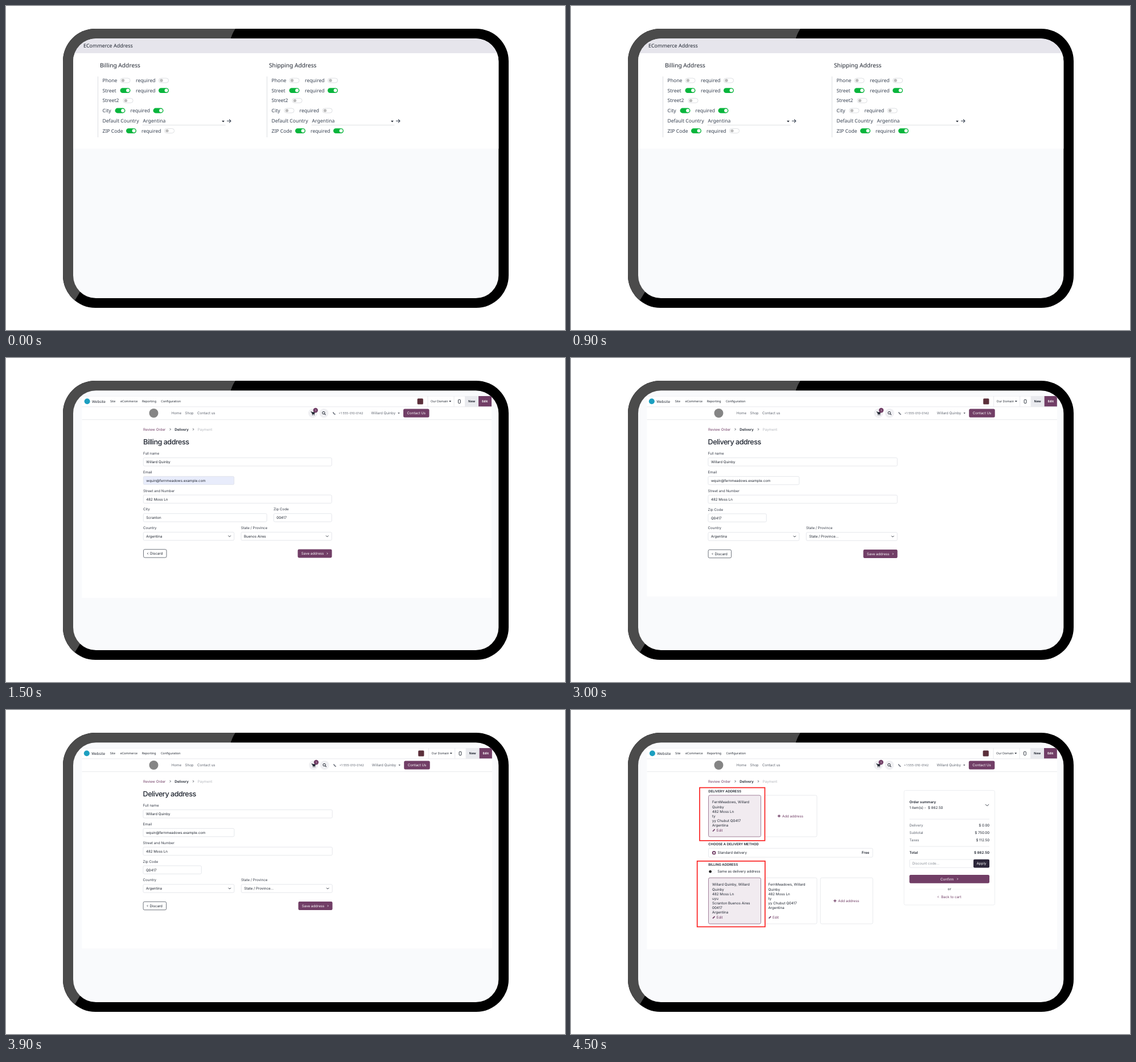
An HTML page that plays this animation: 982x570 px, repeating every 6000 ms.

```html
<!DOCTYPE html>
<html lang="en">
<head>
<meta charset="utf-8">
<title>Checkout address settings</title>
<style>
html, body { margin: 0; height: 100%; overflow: hidden; background: #fff; }
svg { display: block; }
text { font-family: Inter, sans-serif; text-rendering: geometricPrecision; white-space: pre; }
.ui { font-family: "Noto Sans", "Open Sans", sans-serif; }
</style>
</head>
<body>
<svg id="stage" width="982" height="570" viewBox="0 0 982 570"></svg>
<script>
const PLUM = '#713e66', INK = '#1f2530', SOFT = '#5f6570', LINE = '#e3e5e9';
const PERSON = 'Willard Quinby', COMPANY = 'FernMeadows', STREET = '482 Moss Ln';
const EMAIL = 'wquin@fernmeadows.example.com', ZIP = '00417', ZIP2 = 'Q0417';
const [FIRST, LAST] = PERSON.split(' ');

// Text is placed by its left edge and the middle of its capitals.
const text = (x, y, s, { size = 6.2, fill = INK, weight = 400, anchor = 'start', cls = '', gap = 0 } = {}) =>
  `<text x="${x}" y="${y + size * .36}" font-size="${size}" fill="${fill}" font-weight="${weight}" text-anchor="${anchor}" class="${cls}" letter-spacing="${gap}">${s}</text>`;
const ui = (x, y, s, size, weight = 500, fill = INK) => text(x, y, s, { size, weight, fill, cls: 'ui' });
const rect = (x, y, w, h, fill = 'none', stroke = 'none', r = 0, sw = .8) =>
  `<rect x="${x}" y="${y}" width="${w}" height="${h}" rx="${r}" fill="${fill}" stroke="${stroke}" stroke-width="${sw}"/>`;
const dot = (x, y, r, fill, stroke = 'none', sw = 1) =>
  `<circle cx="${x}" cy="${y}" r="${r}" fill="${fill}" stroke="${stroke}" stroke-width="${sw}"/>`;
const path = (d, stroke = INK, sw = .9, fill = 'none') =>
  `<path d="${d}" stroke="${stroke}" stroke-width="${sw}" fill="${fill}"/>`;
const hline = (x1, x2, y, c = LINE) => path(`M${x1} ${y}H${x2}`, c, .8);
const vline = (x, y1, y2, c = LINE) => path(`M${x} ${y1}V${y2}`, c, .8);
const caret = (x, y, s = 2) => path(`M${x - s} ${y - s / 2}h${2 * s}l${-s} ${s * 1.1}z`, 'none', 0, INK);
const down = (x, y, s = 2.2) => path(`M${x - s} ${y - s / 2}l${s} ${s}l${s} ${-s}`);
const right = (x, y, c = INK, s = 1.7) => path(`M${x - s / 2} ${y - s}l${s} ${s}l${-s} ${s}`, c, .8);
const left = (x, y, c = INK, s = 1.5) => path(`M${x + s / 2} ${y - s}l${-s} ${s}l${s} ${s}`, c, .8);

function toggle(x, y, on) {
  return on
    ? rect(x, y - 4.4, 18, 8.8, '#08b53c', 'none', 4.4) + dot(x + 13.6, y, 3, '#fff')
    : rect(x + .4, y - 4, 17.2, 8, '#fff', '#d5d7db', 4) + dot(x + 5, y, 2.7, '#bcbcbc');
}

// Settings column: each row is [label, toggle x, on, "required" x, on].
function settings(x, title, rows) {
  const ys = [131, 148.6, 166.4, 184, 219.6];
  const label = (dx, y, s) => ui(x + dx, y, s, 8.6, 500, '#374151');
  let out = ui(x + 3.5, 104, title, 10.2) + vline(x, 124, 231, '#d3d6db');
  rows.forEach(([name, tx, on, rx, req], i) => {
    out += label(8, ys[i], name) + toggle(x + tx, ys[i], on);
    if (rx) out += label(rx, ys[i], 'required') + toggle(x + rx + 40, ys[i], req);
  });
  return out + label(8, 202, 'Default Country') + ui(x + 79, 202, 'Argentina', 8.6, 400, '#374151') +
    hline(x + 78, x + 224, 209.5, '#d8dadd') + caret(x + 220, 203, 2.4) +
    path(`M${x + 226.5} 202.3h7m-3 -3l3 3l-3 3`, '#374151', 1.1);
}

const column = (x, title, city, zipReq) => settings(x, title, [
  ['Phone', 39, false, 66.5, false],
  ['Street', 39, true, 66.5, true],
  ['Street2', 44],
  ['City', 30, city, 57, city],
  ['ZIP Code', 49.5, true, 76.5, zipReq],
]);

const settingsScene = () =>
  rect(118, 57, 748, 26, '#e6e5ec') + rect(118, 83, 748, 168, '#fff') +
  ui(136, 70, 'ECommerce Address', 8.95) +
  column(161.5, 'Billing Address', true, false) +
  column(458.5, 'Shipping Address', false, true);

// Site chrome; a moves the left menu, b the top right, c the header right.
function site(bottom, a, b, c) {
  const menu = [[183, 'Site'], [201, 'eCommerce'], [239, 'Reporting'], [272.3, 'Configuration']];
  const edge = 853 + Math.min(b, .8);
  return rect(133.5, 67, edge - 133.5, bottom - 67, '#fff') + hline(133.5, edge, 67.2, '#eceef1') +
    dot(142.6 + a, 76.3, 5, '#1c9fc0') + ui(151 + a, 76.3, 'Website', 6.4, 400) +
    menu.map(([x, s]) => ui(x + a * .4, 76.3, s, 5.35)).join('') +
    rect(722.6 + b, 71.2, 10.2, 10.2, '#5b2f3a', 'none', 1.5) +
    vline(741 + b, 67, 85.5) + ui(746 + b, 76.3, 'Our Domain', 5.3) + caret(780.2 + b, 76.3) +
    vline(787 + b, 67, 85.5) + rect(794.5 + b, 73.3, 3.8, 6.2, 'none', INK, .8, .9) +
    rect(806 + b, 67, 24, 18.5, '#e9eaee') + ui(812 + b, 76.3, 'New', 5.4, 700) +
    rect(830 + b, 67, edge - 830 - b, 18.5, PLUM) + ui(836 + b, 76.3, 'Edit', 5.4, 700, '#fff') +
    hline(133.5, edge, 85.8) + hline(133.5, edge, 108.5) +
    dot(259.5, 97, 8, '#858585') +
    [[290.7, 'Home'], [314.5, 'Shop'], [336, 'Contact us']].map(([x, s]) => text(x, 97, s, { fill: SOFT })).join('') +
    `<g transform="translate(${c} 0)">` +
    dot(539, 97, 8, '#f0f0f3') + path('M535.7 94.8h1.3l1 3.6h3.6l.8 -2.8h-4.9z', INK, .8, INK) +
    dot(538.5, 100, .8, INK) + dot(541.3, 100, .8, INK) +
    dot(543.8, 92, 4.2, PLUM) + text(543.8, 92, '1', { size: 4.6, fill: '#fff', anchor: 'middle' }) +
    dot(558.5, 97, 8, '#f0f0f3') + dot(557.9, 96.5, 2.2, 'none', INK, 1) + path('M559.5 98.1l2 2', INK, 1.1) +
    path('M574.7 95q.4 3.4 3.9 4.2', SOFT, 1.4) +
    text(584.3, 97.2, '+1 555-010-0142', { size: 5.4, fill: SOFT }) +
    text(641.6, 97, PERSON, { fill: SOFT }) + caret(690, 97, 1.7) +
    rect(698, 89.5, 45.5, 15, PLUM, 'none', 2.5) +
    text(720.8, 97, 'Contact Us', { fill: '#fff', anchor: 'middle' }) + '</g>' +
    text(241, 125.5, 'Review Order', { fill: PLUM }) + right(288.5, 125.5) +
    text(296.2, 125.5, 'Delivery', { weight: 600 }) + right(329, 125.5) +
    text(336.8, 125.5, 'Payment', { fill: '#b3b6bc' });
}

// Form fields: [row, x, width, label, value, kind].
function form(title, x, end, pitch, fields) {
  const by = 344 + (pitch - 32.7) * 6;
  return text(x, 147, title, { size: 12.6, weight: 500, gap: -.5 }) +
    fields.map(([row, fx, w, label, value, kind]) => {
      const y = 168 + row * pitch;
      return text(fx, y, label, { fill: '#343a46' }) +
        rect(fx + .3, y + 7.6, w - .6, 14.4, kind === 'filled' ? '#e8ecfb' : '#fff', '#dfe1e6', 2) +
        text(fx + 5.3, y + 14.9, value) +
        (kind === 'select' ? down(fx + w - 8.3, y + 14.7) : '');
    }).join('') +
    rect(x + .5, by - 7.3, 40.5, 14.4, '#fff', '#4b515c', 2.3) + left(x + 8, by) + text(x + 12, by, 'Discard') +
    rect(end - 60, by - 7.5, 60, 14.9, PLUM, 'none', 2.3) +
    text(end - 53.7, by, 'Save address', { fill: '#fff' }) + right(end - 8, by, '#fff', 1.5);
}

const billingScene = () => site(422, 0, 0, 0) + form('Billing address', 241, 572.5, 32.7, [
  [0, 241, 331.5, 'Full name', PERSON],
  [1, 241, 160, 'Email', EMAIL, 'filled'],
  [2, 241, 331.5, 'Street and Number', STREET],
  [3, 241, 217.5, 'City', 'Scranton'],
  [3, 470, 102.5, 'Zip Code', ZIP],
  [4, 241, 160, 'Country', 'Argentina', 'select'],
  [4, 412.7, 159.8, 'State / Province', 'Buenos Aires', 'select'],
]);

const deliveryScene = () => site(419.5, -.8, 1.6, 1.2) + form('Delivery address', 240.6, 573.5, 32.8, [
  [0, 240.6, 332.9, 'Full name', PERSON],
  [1, 240.6, 160.6, 'Email', EMAIL],
  [2, 240.6, 332.9, 'Street and Number', STREET],
  [3, 240.6, 103, 'Zip Code', ZIP2],
  [4, 240.6, 160.6, 'Country', 'Argentina', 'select'],
  [4, 413, 160.5, 'State / Province', 'State / Province...', 'select'],
]);

function card(x, y, h, lines, chosen) {
  const tops = [11.5, 20.7, 29, 37, 44.8, 52.8, 60.6], ey = y + h - 11.5;
  return rect(x, y, 92, h, chosen ? '#f1ebf0' : '#fff', chosen ? '#8d6684' : LINE, 2.5) +
    lines.map((s, i) => text(x + 6.5, y + tops[i], s)).join('') +
    path(`M${x + 7.5} ${ey + 2}l3.6 -3.6`, PLUM, 1.7) + text(x + 14, ey, 'Edit', { fill: PLUM });
}
const addCard = (x, y, h) => rect(x, y, 92, h, '#fff', LINE, 2.5) +
  path(`M${x + 23} ${y + h / 2}h5m-2.5 -2.5v5`, PLUM, 1.3) +
  text(x + 31, y + h / 2, 'Add address', { fill: PLUM });

function summary() {
  const bold = { weight: 600 };
  const row = (y, name, value, style = {}) =>
    text(594.5, y, name, { fill: SOFT, ...style }) + text(735.2, y, value, { anchor: 'end', ...style });
  return rect(585, 141.5, 159.5, 201.5, '#fff', '#e8eaed', 2.5) +
    text(594.5, 162, 'Order summary', bold) + text(594.5, 171.5, '1 item(s) -  $ 862.50') + down(731, 167.3, 3) +
    hline(594.5, 735, 192) +
    row(203.2, 'Delivery', '$ 0.00') + row(215.8, 'Subtotal', '$ 750.00') + row(228.3, 'Taxes', '$ 112.50') +
    hline(594.5, 735, 240) + row(250.5, 'Total', '$ 862.50', { ...bold, fill: INK }) +
    rect(594.8, 263, 112.5, 14.2, '#fff', LINE, 2) + text(599.5, 270.2, 'Discount code...', { fill: '#8b9099' }) +
    rect(707, 262.7, 28, 14.9, '#2b2639', 'none', 2) + text(721, 270.2, 'Apply', { fill: '#fff', anchor: 'middle' }) +
    rect(594.5, 290, 140.5, 14.8, PLUM, 'none', 2.3) + text(649, 297.3, 'Confirm', { fill: '#fff' }) + right(679, 297.3, '#fff', 1.5) +
    hline(594.5, 658, 315.2, '#f0f1f3') + hline(671, 735, 315.2, '#f0f1f3') +
    text(664.8, 314.8, 'or', { anchor: 'middle' }) +
    left(645, 328.8, PLUM) + text(650.3, 328.8, 'Back to cart', { fill: PLUM });
}

function checkoutScene() {
  const head = (y, s) => text(241.2, y, s, { size: 5.9, weight: 600 });
  const mine = [`${COMPANY}, ${FIRST}`, LAST, STREET, 'ty', `yy Chubut ${ZIP2}`, 'Argentina'];
  const bill = [`${PERSON}, ${FIRST}`, LAST, STREET, 'uyu', 'Scranton Buenos Aires', ZIP, 'Argentina'];
  const frame = (x, y, w, h) => rect(x, y, w, h, 'none', '#fb2222', 0, 1.7);
  return site(421, .3, 1, .8) +
    head(142.6, 'DELIVERY ADDRESS') + card(241.5, 150, 73, mine, true) + addCard(340, 150, 73) +
    head(236, 'CHOOSE A DELIVERY METHOD') + rect(241.5, 243.3, 288.5, 15.7, '#fff', LINE, 2) +
    dot(251.2, 251.2, 2.4, '#fff', PLUM, 1.8) + text(257.5, 251.2, 'Standard delivery') +
    text(524, 251.2, 'Free', { weight: 600, anchor: 'end' }) +
    head(272, 'BILLING ADDRESS') + rect(241.8, 281, 11.5, 6.4, '#fff', '#eceef1', 3.2) + dot(244.7, 284.2, 2.3, '#111') +
    text(257.3, 284.2, 'Same as delivery address') +
    card(241.5, 295.2, 81, bill, true) + card(340, 295.2, 81, mine) + addCard(438.2, 295.2, 81) +
    summary() + frame(226, 136.6, 114.5, 93.2) + frame(221.7, 265.8, 119.2, 115.6);
}

const scenes = [settingsScene, billingScene, deliveryScene, checkoutScene];
const stage = document.getElementById('stage');
stage.innerHTML =
  `<defs><clipPath id="screen">${rect(118, 57.3, 747.3, 456.7, '#000', 'none', 40)}</clipPath>
  <clipPath id="shine"><path d="M90 30H408L403 40Q398 47 395 57L130 503L121.5 517L108 540H90Z"/></clipPath></defs>` +
  rect(100, 40, 783, 491, '#000', 'none', 57) +
  `<g clip-path="url(#shine)">${rect(100, 40, 783, 491, '#4b4b4b', 'none', 57)}</g>` +
  `<g clip-path="url(#screen)">${rect(117, 56, 750, 460, '#f9fafc')}` +
  scenes.map(draw => `<g class="scene">${draw()}</g>`).join('') + '</g>';

const layers = stage.querySelectorAll('.scene');
function tick() {
  const now = Math.floor(performance.now() % 6000 / 1500);
  layers.forEach((g, i) => g.setAttribute('visibility', i === now ? 'visible' : 'hidden'));
  requestAnimationFrame(tick);
}
tick();
</script>
</body>
</html>
```
